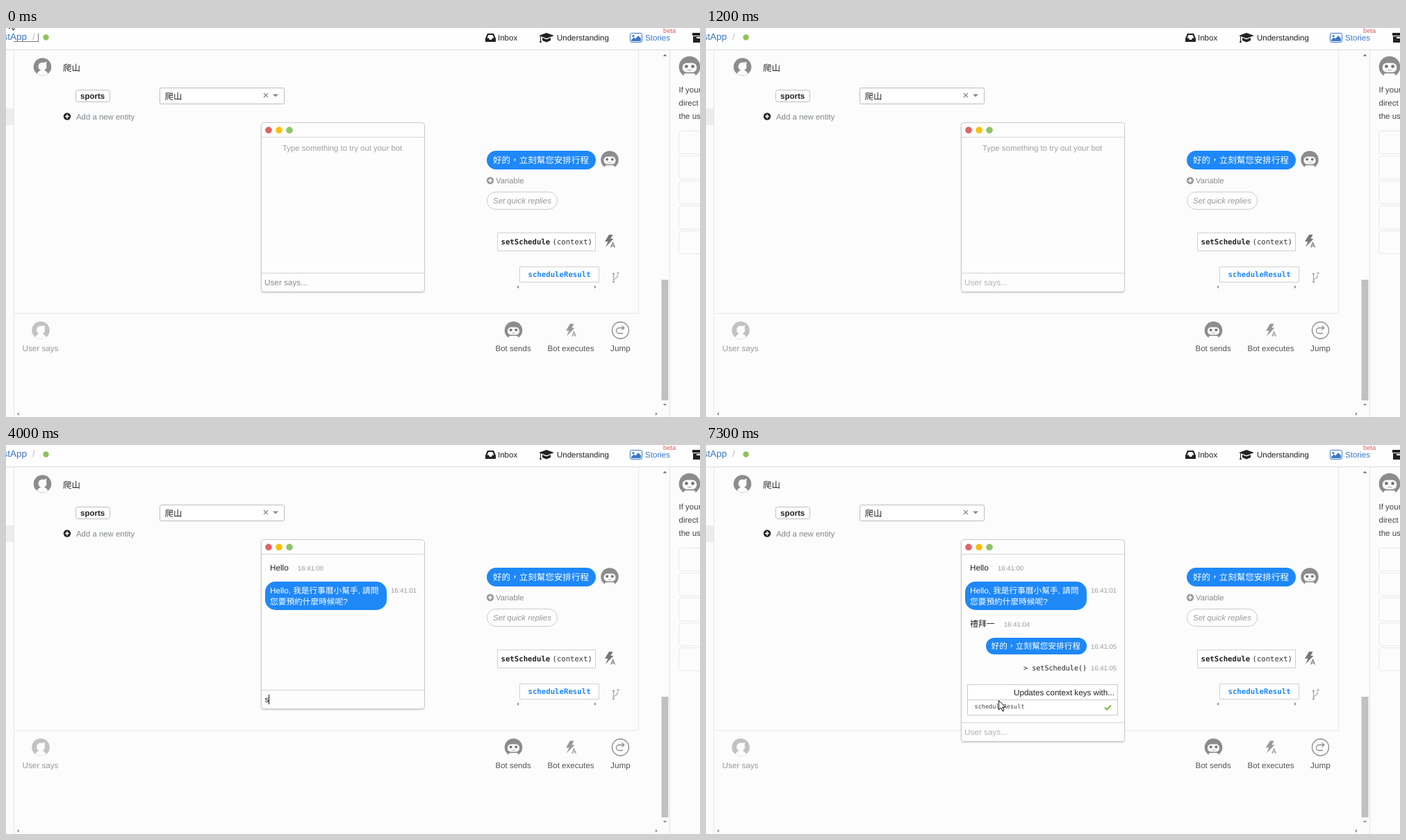
Write an HTML page with a canvas that moves like this. It is 999 px wide and 561 px high and loops after 8 s.

```html
<!DOCTYPE html>
<html lang="zh-Hant">
<head>
<meta charset="utf-8">
<title>Bot chat demo</title>
<style>
html, body { margin: 0; width: 100%; height: 100%; overflow: hidden; background: #fcfcfc; }
canvas { display: block; width: 999px; height: 561px; }
</style>
</head>
<body>
<canvas id="stage" width="999" height="561"></canvas>
<script>
const ctx = document.getElementById('stage').getContext('2d');
const LOOP = 8000;
const SANS = '"Liberation Sans", "Noto Sans CJK TC", "Noto Sans CJK", sans-serif';
const MONO = '"DejaVu Sans Mono", monospace';
const BLUE = '#1e88f7', LINK = '#3b78c4', INK = '#222', GREY = '#8c8c8c', BG = '#fcfcfc';

function text(str, x, y, size = 11.5, color = INK, style = '', family = SANS) {
  ctx.font = `${style} ${size}px ${family}`;
  ctx.fillStyle = color;
  ctx.fillText(str, x, y);
}
const mono = (str, x, y, size, color, style) => text(str, x, y, size, color, style, MONO);

function rect(x, y, w, h, color) {
  ctx.fillStyle = color;
  ctx.fillRect(x, y, w, h);
}

// Rounded box whose one pixel border lies on whole pixels.
function box(x, y, w, h, r, fill, stroke) {
  const d = stroke ? 0.5 : 0;
  ctx.beginPath();
  ctx.roundRect(x + d, y + d, w - 2 * d, h - 2 * d, r);
  if (fill) { ctx.fillStyle = fill; ctx.fill(); }
  if (stroke) { ctx.strokeStyle = stroke; ctx.lineWidth = 1; ctx.stroke(); }
}

function disc(x, y, r, color) {
  ctx.fillStyle = color;
  ctx.beginPath();
  ctx.arc(x, y, r, 0, 7);
  ctx.fill();
}

function poly(points, fill, stroke, width = 1, open = false) {
  ctx.beginPath();
  points.forEach(([x, y]) => ctx.lineTo(x, y));
  if (!open) ctx.closePath();
  if (fill) { ctx.fillStyle = fill; ctx.fill(); }
  if (stroke) { ctx.strokeStyle = stroke; ctx.lineWidth = width; ctx.stroke(); }
}

function at(x, y, scale, draw) {
  ctx.save();
  ctx.translate(x, y);
  ctx.scale(scale, scale);
  draw();
  ctx.restore();
}

function userIcon(x, y, color) {
  at(x, y, 1, () => {
    disc(0, 0, 12.8, color);
    ctx.beginPath();
    ctx.moveTo(-8, 10);
    ctx.quadraticCurveTo(-6, 6, -2.5, 5);
    ctx.lineTo(2.5, 5);
    ctx.quadraticCurveTo(6, 6, 8, 10);
    ctx.quadraticCurveTo(0, 15, -8, 10);
    ctx.fillStyle = BG;
    ctx.fill();
    disc(0, -0.5, 6, BG);
    poly([[1, -5.5], [6, -7.5], [5.5, -1.5]], BG);
  });
}

function botIcon(x, y, scale = 1) {
  at(x, y, scale, () => {
    disc(0, 0, 12.8, GREY);
    box(-8.5, -4.5, 17, 11, 5, BG);
    box(-7, 8, 14, 6, 2.5, BG);
    disc(-3.8, -0.5, 2, '#777');
    disc(3.8, -0.5, 2, '#777');
    rect(-2.5, 3.5, 5, 1, '#aaa');
  });
}

function boltIcon(x, y, color) {
  at(x, y, 1, () => {
    poly([[-1, -10], [4.5, -10], [1.5, -4], [5.5, -4], [-6, 8], [-2.5, 0], [-7, 0]], color);
    poly([[1.8, 8.5], [4.6, 1.5], [7.4, 8.5]], null, color, 1.2, true);
    rect(3, 5.8, 3.4, 1, color);
  });
}

function plusIcon(x, y, color) {
  disc(x, y, 5.2, color);
  rect(x - 3, y - 0.8, 6, 1.6, BG);
  rect(x - 0.8, y - 3, 1.6, 6, BG);
}

// Small triangle; dx, dy give the pointing direction.
function tri(x, y, dx, dy, size, color) {
  poly([[x + dx * size, y + dy * size], [x - dy * size, y + dx * size], [x + dy * size, y - dx * size]], color);
}

function header() {
  rect(0, 0, 999, 31, '#fefefe');
  rect(0, 31, 999, 1, '#dcdcdc');
  text('stApp', -4.5, 17, 13.5, LINK);
  text('/', 38, 17, 13.5, '#bbb');
  disc(57.5, 13.5, 4.2, '#8fc25d');

  // inbox tray
  poly([[690, 15], [693, 8], [702, 8], [705, 15], [705, 20], [690, 20]], INK);
  poly([[692.5, 14.5], [694.5, 10], [700.5, 10], [702.5, 14.5], [700, 14.5], [699, 17], [696, 17], [695, 14.5]], '#fefefe');
  text('Inbox', 708, 18, 11.5, INK);

  // graduation cap
  poly([[767, 11], [778, 7], [789, 11], [778, 15]], INK);
  poly([[772, 14], [778, 16.5], [784, 14], [784, 18], [778, 20.5], [772, 18]], INK);
  rect(769, 12, 1, 5, INK);
  poly([[769.5, 16], [771, 21], [768, 21]], INK);
  text('Understanding', 793, 18, 11.5, INK);

  // picture
  box(898, 7, 18, 14, 2, '#fff', LINK);
  disc(903, 11.5, 1.6, LINK);
  poly([[900, 19], [900, 17], [904, 13.5], [906, 15.5], [910, 11], [914, 15], [914, 19]], LINK);
  text('Stories', 920, 18, 11.6, LINK);
  text('beta', 946, 7, 9.3, '#dd5a55');

  // archive
  rect(988, 7, 11, 4, INK);
  rect(989, 12, 10, 9, INK);
  rect(994, 13, 5, 2, '#fefefe');
}

function story() {
  rect(0, 116, 11, 24, '#ececec');
  rect(11, 32, 1, 529, '#e6e6e6');
  rect(910, 32, 1, 380, '#e8e8e8');
  rect(11, 411, 900, 1, '#e8e8e8');

  userIcon(52.5, 56, GREY);
  text('爬山', 82, 62, 12.5);
  box(100, 89, 50, 18, 3, '#fff', '#bdbdbd');
  text('sports', 107, 102, 11.5, INK, 'bold');
  box(221, 86, 180, 24, 2, '#fff', '#bdbdbd');
  text('爬山', 228.5, 102.5, 12.5);
  poly([[371, 94], [377, 100]], null, '#888', 1.2);
  poly([[377, 94], [371, 100]], null, '#888', 1.2);
  poly([[384, 95.5], [392, 95.5], [388, 99.5]], '#888');
  plusIcon(88, 127.5, INK);
  text('Add a new entity', 101, 132, 11.4, '#80878c');

  box(692, 177, 157, 27, 13.5, BLUE);
  text('好的，立刻幫您安排行程', 701, 195, 12.55, '#fff');
  botIcon(869, 190);
  plusIcon(697, 220, '#999');
  text('Variable', 705, 224, 11.3, '#8c8c8c');
  box(692, 236, 102, 26, 12.5, '#fefefe', '#ccc');
  text('Set quick replies', 701, 253, 11.45, '#999', 'italic');

  box(707, 295, 142, 27, 0, '#fff', '#d0d0d0');
  mono('setSchedule', 712.5, 312, 10.7, INK, 'bold');
  mono('(context)', 786.5, 312, 10.6, '#333');
  boltIcon(869, 308, '#777');
  box(739, 344, 115, 23, 0, '#fff', '#d0d0d0');
  mono('scheduleResult', 751.5, 359, 10.7, BLUE, 'bold');
  tri(738, 373.5, -1, 0, 2.5, '#888');
  tri(847, 373.5, 1, 0, 2.5, '#888');

  // branch
  poly([[874.5, 354], [874.5, 366]], null, '#aaa', 1.3);
  poly([[874.5, 363], [880, 359.5], [880, 356]], null, '#aaa', 1.3, true);
  disc(874.5, 354.5, 1.6, '#aaa');
  disc(874.5, 366, 1.6, '#aaa');
  rect(879, 353, 4, 1, '#aaa');
  rect(880.5, 351.5, 1, 4, '#aaa');
}

function actions() {
  userIcon(50, 436, '#c2c2c2');
  text('User says', 23.5, 465.5, 11.7, '#999');
  botIcon(730.5, 436);
  text('Bot sends', 704.5, 465.5, 11.5, '#555');
  boltIcon(813, 436.5, '#999');
  text('Bot executes', 779.5, 465.5, 11.6, '#555');
  ctx.strokeStyle = GREY;
  ctx.lineWidth = 1.3;
  ctx.beginPath();
  ctx.arc(884.5, 436, 12, 0, 7);
  ctx.stroke();
  ctx.beginPath();
  ctx.moveTo(888, 440.5);
  ctx.lineTo(882.5, 440.5);
  ctx.arc(882.5, 436.5, 4, Math.PI / 2, Math.PI * 1.5);
  ctx.lineTo(889, 432.5);
  ctx.stroke();
  poly([[886.5, 429.5], [889.8, 432.5], [886.5, 435.5]], null, GREY, 1.3, true);
  text('Jump', 870, 465.5, 11.8, '#555');
}

function sidePanel() {
  tri(948.5, 40.5, 0, -1, 2.8, '#666');
  tri(948.5, 542, 0, 1, 2.8, '#888');
  tri(18.5, 556.5, -1, 0, 2.6, '#888');
  tri(935, 556.5, 1, 0, 2.6, '#888');
  rect(943.5, 363, 10, 174, '#c1c1c1');
  rect(955, 32, 1, 529, '#e4e4e4');
  botIcon(984, 56, 1.2);
  ['If your', 'direct', 'the us'].forEach((line, i) => text(line, 968.5, 93 + i * 19, 11.5, '#444'));
  for (let i = 0; i < 5; i++) box(968, 148 + i * 36, 50, 34, 4, BG, '#e9e9e9');
}

function stamp(time, x, y) {
  text(time, x, y, 9.5, '#999');
}

// [start, typed text, composing]; empty text shows the placeholder
const TYPING = [
  [0, ''], [1400, 'H'], [1600, 'He'], [1700, 'Hel'], [1800, 'Hell'], [2000, 'Hello'],
  [2300, ''], [4000, 's'], [4500, ''], [4900, 'ㄌㄧ', true], [5000, '禮', true],
  [5200, '禮ㄅ', true], [5300, '禮ㄅㄞ', true], [5400, '禮拜', true],
  [5600, '禮拜ㄧ', true], [5900, '禮拜一', true], [6000, '']
];
// times at which the caret toggles, starting hidden
const BLINK = [600, 1200, 1400, 2700, 3300, 3800, 4000, 6500, 7100, 7300];

function inputLine(t, y) {
  const [, typed, composing] = TYPING.findLast(step => step[0] <= t);
  let end = 372.5;
  if (typed) {
    text(typed, 372.5, y, 11.7);
    const width = ctx.measureText(typed).width;
    end += width;
    if (composing) rect(373, y + 2, Math.round(width), 1, INK);
  } else {
    text('User says...', 372, y, 11.75, t < 600 ? '#8a8a8a' : '#b4b4b4');
  }
  if (BLINK.filter(b => b <= t).length % 2) rect(Math.round(end), y - 11, 1, 14, '#111');
}

function chat(t) {
  const bottom = t < 7300 ? 381 : 428;
  ctx.save();
  ctx.shadowColor = 'rgba(0,0,0,.2)';
  ctx.shadowBlur = 2;
  ctx.shadowOffsetY = 1;
  box(367, 136, 235.5, bottom - 136, 4, '#fdfdfd');
  ctx.restore();
  box(367, 136, 236, bottom - 136, 4, '#fdfdfd', '#cbcbcb');
  ['#e06461', '#fbbf09', '#8fc467'].forEach((c, i) => disc(378 + i * 15, 147.3, 4.8, c));
  rect(368, 157, 234, 1, '#d4d4d4');
  rect(368, bottom - 28, 234, 1, '#d4d4d4');

  if (t < 2300) {
    text('Type something to try out your bot', 398, 177, 11.4, '#a0a0a0');
  } else {
    text('Hello', 380, 181, 11.7);
    stamp('16:41:00', 420, 181);
  }
  if (t >= 3600) {
    box(373, 197, 175, 41, 15, BLUE);
    text('Hello, 我是行事曆小幫手, 請問', 380, 214, 11.7, '#fff');
    text('您要預約什麼時候呢?', 380, 230, 11.7, '#fff');
    stamp('16:41:01', 554, 213);
  }
  if (t >= 6000) {
    text('禮拜一', 380, 262, 11.9);
    stamp('16:41:04', 429, 262);
  }
  if (t >= 7100) {
    box(403, 278, 145, 24, 12, BLUE);
    text('好的，立刻幫您安排行程', 410.5, 294, 11.7, '#fff');
    stamp('16:41:05', 554, 294);
  }
  if (t >= 7300) {
    mono('> setSchedule()', 457, 324.5, 10.1);
    stamp('16:41:05', 554, 324.5);
    box(376, 345, 217, 45, 0, '#fff', '#c8c8c8');
    rect(377, 367, 215, 1, '#ccc');
    text('Updates context keys with...', 443, 360.5, 11.65);
    mono('scheduleResult', 386.5, 379.5, 8.55, '#444');
    poly([[574, 378.5], [577, 381.5], [583, 375.5]], null, '#84bf55', 2.4, true);
  }
  inputLine(t, bottom - 10);
}

function pointer(x, y) {
  at(x, y, 1, () => poly(
    [[0.5, 0.5], [0.5, 14], [3.5, 11], [6, 16], [8, 15], [5.7, 10.3], [9.8, 10.3]], '#fff', '#111'));
}

function movePointer(t) {
  if (t < 100) {
    rect(11, 19, 36, 1, '#777');
    rect(46, 8, 1, 12, '#777');
  }
  if (t < 600) {
    const p = Math.floor(t / 100) / 6;
    const e = p * p * (3 - 2 * p);
    pointer(Math.round(4 + 417 * e), Math.round(-13 + 381 * e));
  } else if (t >= 7300) {
    pointer(421, 368);
  }
}

function draw(t) {
  ctx.textRendering = 'geometricPrecision';
  rect(0, 0, 999, 561, BG);
  header();
  story();
  actions();
  sidePanel();
  chat(t);
  movePointer(t);
}

const start = performance.now();
function tick() {
  draw((performance.now() - start) % LOOP);
  requestAnimationFrame(tick);
}
tick();
</script>
</body>
</html>
```
